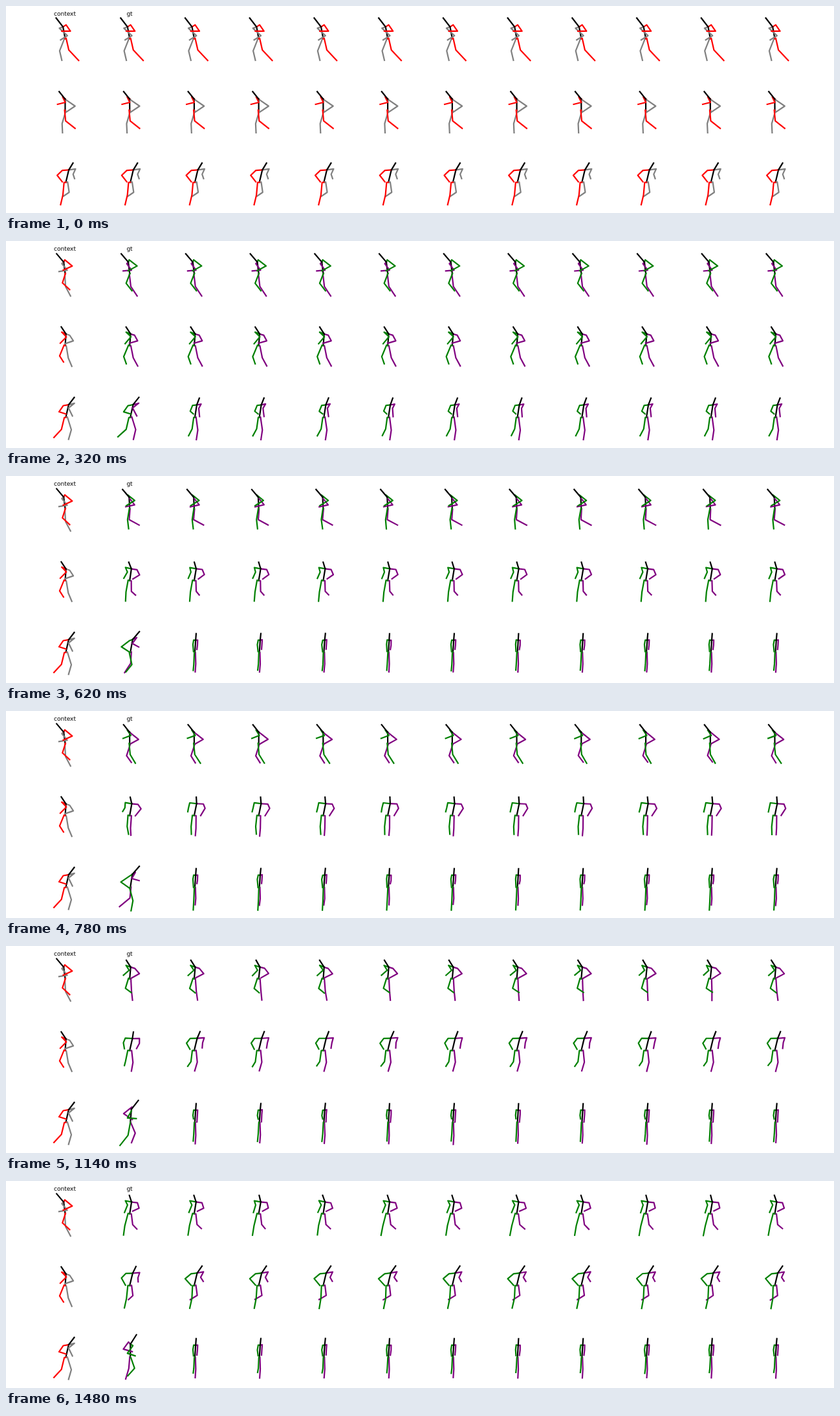
An HTML page with a canvas that plays this animation: 1280x320 px, repeating every 1500 ms.

```html
<!DOCTYPE html>
<html lang="en">
<head>
<meta charset="utf-8">
<title>Walking poses</title>
<style>
html, body { margin: 0; width: 100%; height: 100%; overflow: hidden; background: #fff; }
canvas { position: absolute; left: 0; top: 0; }
span { position: absolute; top: 6px; width: 80px; text-align: center;
       font: 9px/12px "DejaVu Sans", sans-serif; color: #000; }
</style>
</head>
<body>
<canvas id="stage" width="1280" height="320"></canvas>
<span style="left:51px">context</span>
<span style="left:151px">gt</span>
<script>
const LOOP = 1500, STEP = 20, LAST = 280, COLS = 12, PITCH = 99.73;
const STRIDE = 920;      // ms per walking cycle
const TURN = 0.058;      // degrees per ms
const TILT = 0.27;       // how far depth shows as height
const g = document.getElementById('stage').getContext('2d');

// Heading 0 faces left, 90 faces the viewer, 180 faces right.
const rows = [
  { x: 91, y: 50, heading: -28, phase: 0, lead: 2 },
  { x: 91, y: 161, heading: 18, phase: 0.03, lead: 14 },
  { x: 92, y: 272, heading: 112, phase: 0.67, collapse: true },
];

const clamp = v => Math.max(0, Math.min(1, v));
const mix = (a, b, k) => a + (b - a) * k;
const wave = turns => Math.cos(turns * 2 * Math.PI);
const add = (p, q) => p.map((v, i) => v + q[i]);

// Repeatable value in -1..1.
function noise(n) {
  const v = Math.sin(n * 127.1) * 43758.5453;
  return 2 * (v - Math.floor(v)) - 1;
}

// Points are [forward, sideways, up] from the pelvis; side is -1 for A, 1 for B.
function arm(neck, side, u) {
  const swing = wave(u);
  const shoulder = add(neck, [0.5, 11 * side, 0.5]);
  const elbow = add(shoulder, [-9.5 + 4 * swing, -2.5 + 1.5 * side, -10]);
  const hand = add(elbow, [13.5, -3 * side, -5 + 4 * swing]);
  return [neck, shoulder, elbow, hand];
}

// u counts cycles since the foot left the ground.
function leg(side, u, reach) {
  const lift = Math.sin(Math.PI * clamp((u - Math.floor(u)) / 0.43));
  return [
    [0, 0, 0],
    [0, 3 * side, 0],
    [2 - 5.5 * wave(u + 0.06), -0.5 + 5.5 * side, -18.5 + 3 * lift],
    [-7 - 12 * reach * wave(u - 0.03), -3.5 + 5.5 * side, -33.5 + 8.5 * lift],
  ];
}

function body(u, reach) {
  const neck = [1.5, 4.35, 19];
  return {
    spine: [[0, 0, 0], neck],
    armB: arm(neck, 1, u + 0.5),
    legB: leg(1, u + 0.5, reach),
    armA: arm(neck, -1, u),
    legA: leg(-1, u, reach),
    head: [neck, [12.1, 7, 32]],
  };
}

function project([forward, side, up], heading, width) {
  const a = heading * Math.PI / 180, c = Math.cos(a), s = Math.sin(a);
  return [
    (side * s - forward * c) * width,
    TILT * (forward * s + side * c) - up,
  ];
}

function line(color, points) {
  g.strokeStyle = color;
  g.beginPath();
  points.forEach(p => g.lineTo(p[0], p[1]));
  g.stroke();
}

function drawFigure(r, col, time) {
  const row = rows[r], t = col ? time : Math.min(time, LAST);
  let heading = row.heading + TURN * t;
  let u = row.phase + t / STRIDE, reach = 1, width = 1;

  // Samples drift away from the true motion once the context ends.
  if (col > 1 && t > LAST) {
    const seed = r * COLS + col, grow = clamp((t - LAST) / 800);
    u += 0.025 * grow * noise(seed);
    reach += grow * (0.08 + 0.1 * noise(seed + 50));
    if (row.collapse) {
      const k = clamp((t - LAST) / 80);
      heading = mix(heading, 93 + 8 * noise(seed + 90), k);
      width = mix(1, 0.28, k);
    } else {
      heading += grow * (row.lead + 4 * noise(seed + 90));
    }
  }

  const [a, b] = col && t > LAST ? ['green', 'purple'] : ['red', 'gray'];
  const parts = body(u, reach);
  g.save();
  g.translate(row.x + 0.5 + col * PITCH, row.y + 0.5);
  for (const name in parts) {
    const color = name.endsWith('A') ? a : name.endsWith('B') ? b : 'black';
    line(color, parts[name].map(p => project(p, heading, width)));
  }
  g.restore();
}

function frame(now) {
  const t = Math.floor(now % LOOP / STEP) * STEP;
  g.clearRect(0, 0, 1280, 320);
  g.lineWidth = 2.2;
  g.lineCap = 'square';
  g.lineJoin = 'round';
  for (let r = 0; r < rows.length; r++)
    for (let col = 0; col < COLS; col++) drawFigure(r, col, t);
}

const start = performance.now();
function tick() {
  frame(performance.now() - start);
  requestAnimationFrame(tick);
}
tick();
</script>
</body>
</html>
```
